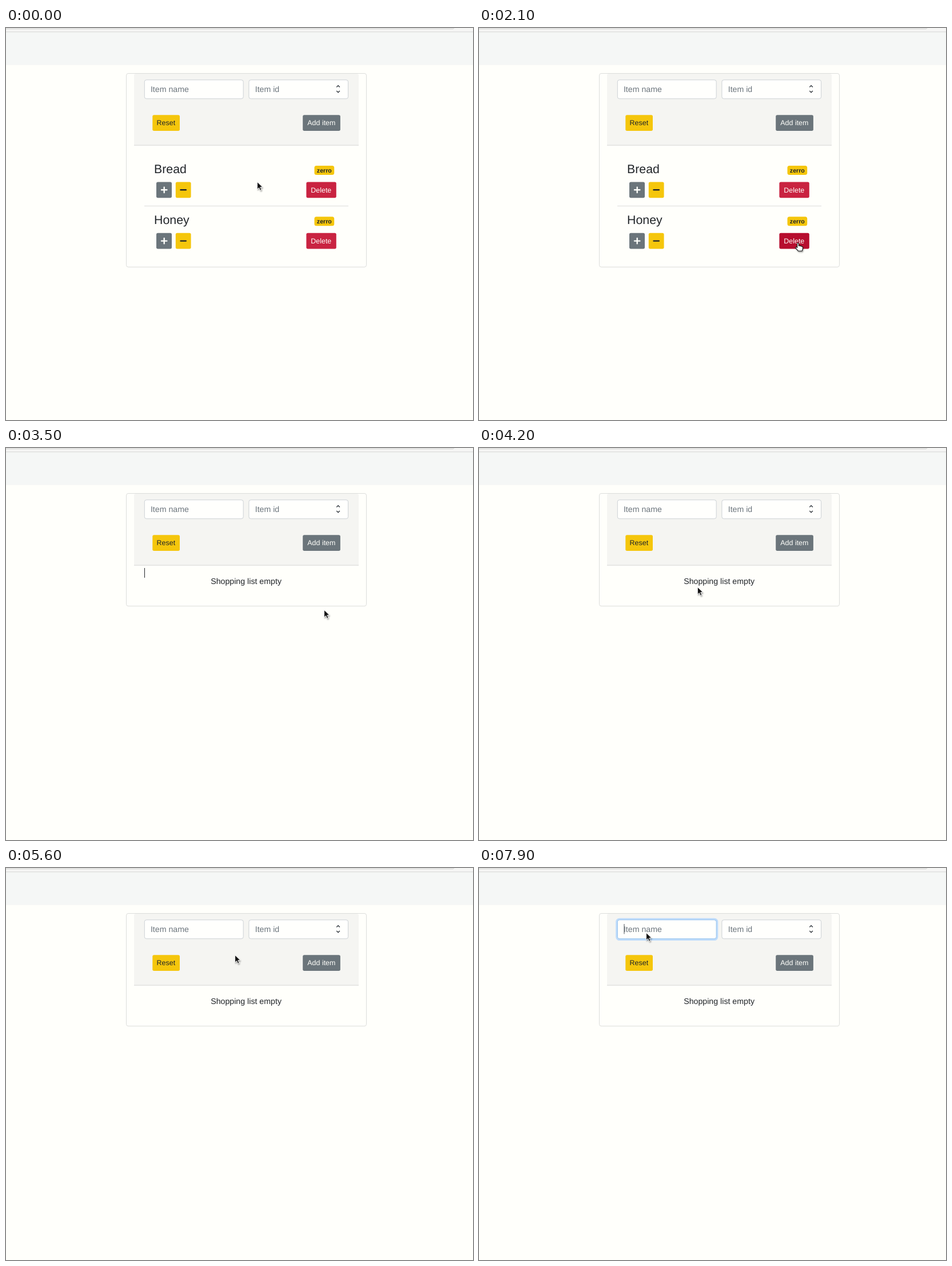
These frames come from a looping animation (817x686 px, 8000 ms). An HTML page:

```html
<!DOCTYPE html>
<html lang="en">
<head>
<meta charset="utf-8">
<title>Shopping list</title>
<style>
  html, body { margin: 0; width: 100%; height: 100%; overflow: hidden; background: #fffffb; }
  svg { display: block; width: 817px; height: 686px; }
  text { font: 14.2px "Liberation Sans", Arial, sans-serif; fill: #212529; text-rendering: geometricPrecision; }
  .small { font-size: 12.44px; }
  .title { font-size: 21.33px; }
  .badge { font-size: 10.66px; font-weight: bold; }
  .hint { fill: #6c757d; }
  .light { fill: #fffffb; }
  .yellow { fill: #f5c60c; }
  .grey { fill: #6b757b; }
  .red { fill: #c92341; }
  .red.hover { fill: #b70e2f; }
  .field { fill: #fffffd; stroke: #ccd1d5; }
  .line { stroke: #dcdddb; fill: none; }
  .icon { fill: none; stroke-width: 2.4; stroke-linecap: round; }
  .pointer { stroke-linejoin: round; filter: drop-shadow(1px 2px 1px rgba(0, 0, 0, .35)); }
</style>
</head>
<body>
<svg viewBox="0 0 817 686">
  <defs>
    <g id="rowBody">
      <rect class="yellow" x="539.5" y="241" width="34.7" height="16" rx="3.5"/>
      <text class="badge" x="543.8" y="252.7">zerro</text>
      <rect class="grey" x="263" y="269.4" width="27" height="27.8" rx="2.7"/>
      <path class="icon" stroke="#fffffb" d="M272 283.3h9.4M276.7 278.6v9.4"/>
      <rect class="yellow" x="296.8" y="269.4" width="26.8" height="27.8" rx="2.7"/>
      <path class="icon" stroke="#212529" d="M305.6 283.3h9.2"/>
    </g>
    <rect id="deleteBox" x="525.4" y="269.4" width="52.4" height="27.8" rx="2.7"/>
    <path id="beamShape" d="M-4-8.5Q-1-8.5 0-7 1-8.5 4-8.5M0-7V7M-4 8.5Q-1 8.5 0 7 1 8.5 4 8.5M-2 3H2"/>
  </defs>

  <rect width="817" height="686" fill="#fffffb"/>
  <rect width="817" height="7" fill="#f5f5f4"/>
  <path d="M0 1.5H781q2 0 3-1.5" fill="none" stroke="#cbcbca"/>
  <path d="M0 7H817" stroke="#c9c9c8"/>
  <rect y="7.5" width="817" height="57.3" fill="#f5f7f6"/>

  <rect id="card" class="line" x="210.5" y="79.5" width="420" rx="3.5"/>
  <path d="M224 205V83q0-3 3-3H614q3 0 3 3V205Z" fill="#f5f5f2"/>
  <path d="M224 205.2H617" stroke="#d5d6d4"/>

  <rect id="glow" x="240.7" y="89.2" width="176.1" height="36.4" rx="5" fill="none" stroke="#bfdcfb" stroke-width="3"/>
  <rect id="nameField" class="field" x="242.3" y="90.8" width="172.9" height="33" rx="3.5"/>
  <text class="hint" x="252.9" y="112">Item name</text>
  <path id="fieldCaret" d="M254 98V115.5" stroke="#495057"/>
  <rect class="field" x="424.9" y="90.8" width="173.7" height="33" rx="3.5"/>
  <text class="hint" x="435.7" y="112">Item id</text>
  <path d="M578.3 103.6l2.8-2.8 2.8 2.8M578.3 110l2.8 2.8 2.8-2.8" fill="none" stroke="#343a40" stroke-width="1.4"/>

  <rect class="yellow" x="256.3" y="152.3" width="47.7" height="27.7" rx="2.7"/>
  <text class="small" x="263.6" y="170.4">Reset</text>
  <rect class="grey" x="519.2" y="152.3" width="65.7" height="27.7" rx="2.7"/>
  <text class="small light" x="527.3" y="170.4">Add item</text>

  <g id="bread">
    <text class="title" x="259" y="253.7">Bread</text>
    <use href="#rowBody"/>
    <use id="breadDelete" class="red" href="#deleteBox"/>
    <text class="small light" x="533.3" y="288">Delete</text>
  </g>
  <g id="honey">
    <path class="line" d="M242 311.5H599"/>
    <g transform="translate(0 89.3)">
      <text class="title" x="259" y="253.7">Honey</text>
      <use href="#rowBody"/>
      <use id="honeyDelete" class="red" href="#deleteBox"/>
      <text class="small light" x="533.3" y="288">Delete</text>
    </g>
  </g>
  <text id="empty" x="358.2" y="238.4">Shopping list empty</text>
  <path id="pageCaret" d="M242.5 210V227" stroke="#212529"/>

  <g id="cursor">
    <path id="arrow" class="pointer" d="M-.4-.6V12.3L2.6 9.5 4.7 14.3 7 13.3 4.9 8.6 8.9 8.4Z" fill="#111" stroke="#fff" stroke-width=".9"/>
    <g id="beam" class="pointer" fill="none">
      <use href="#beamShape" stroke="#fff" stroke-width="3.4"/>
      <use href="#beamShape" stroke="#444" stroke-width="1.2"/>
    </g>
    <path id="hand" class="pointer" d="M-1.3 1Q0-1 1.3 1V5.2Q2.6 4.2 3.8 5.6 5 4.8 6.2 6.2 8 5.8 8.4 7.6V10.5L7.2 14.2H.4L-4.2 8.8Q-4.6 7-2.8 7.2L-1.3 8.4Z" fill="#fff" stroke="#111" stroke-width="1.1"/>
  </g>
</svg>
<script>
  const LOOP = 8000, STEP = 100, BLINK = 667;
  const HONEY_GONE = 2500, BREAD_GONE = 3300, CARET_START = 3500, FOCUS = 7500;
  const $ = id => document.getElementById(id);
  const show = (id, on) => $(id).style.display = on ? "" : "none";
  const clamp = v => Math.min(1, Math.max(0, v));

  // pointer moves; it rests wherever the last one ended
  const moves = [
    { from: 600, to: 700, x: 411, y: 241 },
    { from: 800, to: 1100, x: 319, y: 108 },
    { from: 1100, to: 1600, x: 562, y: 326 },
    { from: 1700, to: 2100, x: 558, y: 376 },
    { from: 2600, to: 3100, x: 557, y: 284 },
    { from: 3700, to: 4000, x: 364, y: 245 },
    { from: 4100, to: 4600, x: 458, y: 240 },
    { from: 4600, to: 4800, x: 381, y: 227 },
    { from: 4800, to: 5100, x: 464, y: 248 },
    { from: 5100, to: 5600, x: 401, y: 153 },
    { from: 5600, to: 5900, x: 330, y: 133 },
    { from: 6100, to: 6800, x: 290, y: 126 },
    { from: 6800, to: 7000, x: 293, y: 114 }
  ];

  function pointerAt(t) {
    let x = 440, y = 270;
    for (const m of moves) {
      const k = clamp((t - m.from) / (m.to - m.from));
      x += (m.x - x) * k;
      y += (m.y - y) * k;
    }
    return [x, y];
  }

  function draw(t) {
    const [x, y] = pointerAt(t);
    const inside = (l, top, r, b) => x >= l && x <= r && y >= top && y <= b;
    const hasHoney = t < HONEY_GONE, hasBread = t < BREAD_GONE, focused = t >= FOCUS;

    show("honey", hasHoney);
    show("bread", hasBread);
    show("empty", !hasBread);
    $("card").setAttribute("height", hasHoney ? 338.8 : hasBread ? 249.5 : 197.2);

    const overHoney = hasHoney && inside(525, 359, 578, 387);
    const overBread = hasBread && inside(525, 269, 578, 297);
    $("honeyDelete").classList.toggle("hover", overHoney);
    $("breadDelete").classList.toggle("hover", overBread);

    const overText = inside(242, 91, 415, 124) || (!hasBread && inside(358, 222, 482, 243));
    const shape = overHoney || overBread ? "hand" : overText && t < FOCUS + 300 ? "beam" : "arrow";
    for (const id of ["arrow", "beam", "hand"]) show(id, id === shape);
    $("cursor").setAttribute("transform", `translate(${x} ${y})`);

    const blinkOn = Math.floor((t - CARET_START) / BLINK) % 2 === 0;
    show("pageCaret", t >= CARET_START && !focused && blinkOn);
    show("fieldCaret", t > FOCUS);
    $("glow").style.opacity = clamp((t - FOCUS + 50) / 150);
    $("nameField").style.stroke = focused ? "#8fbfee" : "";
  }

  function tick() {
    const t = performance.now() % LOOP;
    draw(Math.floor(t / STEP) * STEP);
    requestAnimationFrame(tick);
  }
  tick();
</script>
</body>
</html>
```
